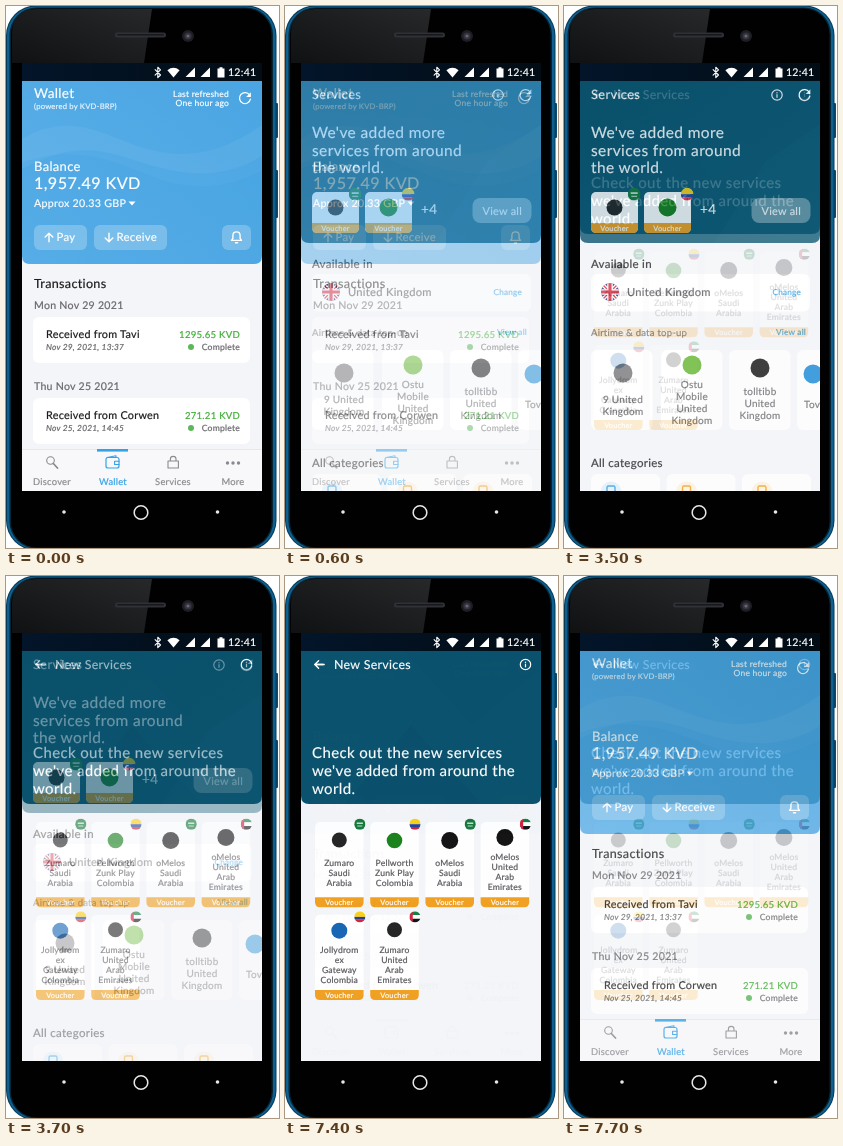
These frames come from a looping animation (273 px wide and 542 px high, 7800 ms). An HTML page:

```html
<!DOCTYPE html>
<html lang="en">
<head>
<meta charset="utf-8">
<title>Wallet app</title>
<style>
  html, body { margin: 0; width: 100%; height: 100%; overflow: hidden; background: #fff; }
  svg { display: block; width: 100vw; height: 100vh; }
  text { font-family: Lato, "Open Sans", sans-serif; font-weight: 400; letter-spacing: .025em;
         text-rendering: geometricPrecision; white-space: pre; }
</style>
</head>
<body>
<svg id="stage" viewBox="0 0 273 542" xmlns="http://www.w3.org/2000/svg"></svg>
<script>
const INK = '#1b1b1d', GREY = '#67676b', BLUE = '#35a2e6', GREEN = '#3fae35',
      ORANGE = '#f0a020', PAGE = '#f4f5f8';

// ---- drawing helpers ----
const rect = (x, y, w, h, fill, r = 0, more = '') =>
  `<rect x="${x}" y="${y}" width="${w}" height="${h}" rx="${r}" fill="${fill}" ${more}/>`;
const disc = (x, y, r, fill, more = '') =>
  `<circle cx="${x}" cy="${y}" r="${r}" fill="${fill}" ${more}/>`;
const line = (d, color, w = 1) =>
  `<path d="${d}" fill="none" stroke="${color}" stroke-width="${w}" stroke-linecap="round" stroke-linejoin="round"/>`;
const shape = (d, fill, more = '') => `<path d="${d}" fill="${fill}" ${more}/>`;
const at = (x, y, body) => `<g transform="translate(${x} ${y})">${body}</g>`;
const text = (x, y, s, size, fill = INK, anchor = 'start', more = '') =>
  `<text x="${x}" y="${y}" font-size="${size}" fill="${fill}" stroke="${fill}" stroke-width=".2" text-anchor="${anchor}" ${more}>${s}</text>`;
const lines = (x, y, step, list, size, fill, anchor) =>
  list.map((s, i) => text(x, y + i * step, s, size, fill, anchor)).join('');

// ---- icons, centred on the given point ----
const refresh = (x, y) => at(x, y,
  line('M4.6 -3A5.5 5.5 0 1 0 5.4 1.2', '#fff', 1.3) + shape('M5.9 -5.8V-1H1.1Z', '#fff'));
const info = (x, y) => disc(x, y, 5.2, 'none', 'stroke="#fff" stroke-width="1.2"') +
  rect(x - .6, y - .8, 1.2, 3.6, '#fff') + rect(x - .6, y - 2.8, 1.2, 1.2, '#fff');
const arrow = (x, y, turn) =>
  `<g transform="translate(${x} ${y}) rotate(${turn})">${line('M0 4.2V-4M-3.8 -.4L0 -4.2L3.8 -.4', '#fff', 1.4)}</g>`;
const bell = (x, y) => at(x, y,
  line('M-5 3.4H5L3.6 1.4V-1.4C3.6 -6.4 -3.6 -6.4 -3.6 -1.4V1.4Z', '#fff', 1.4) + line('M-1 5.8H1', '#fff', 1.5));

let clipId = 0;
function flag(kind, x, y, r) {
  const id = 'flag' + clipId++;
  const band = (top, h, c) => rect(-r, top * r, 2 * r, h * r, c);
  const art = {
    sa: () => band(-1, 2, '#16793c') + rect(-r * .55, -r * .3, r * 1.1, r * .25, '#d5e8da') +
      rect(-r * .45, r * .25, r * .9, r * .15, '#d5e8da'),
    co: () => band(-1, 1, '#fbd116') + band(0, .5, '#23429a') + band(.5, .5, '#d4213d'),
    ae: () => band(-1, .67, '#12803f') + band(-.33, .66, '#fff') + band(.33, .67, '#111') +
      rect(-r, -r, r * .6, 2 * r, '#d4213d'),
    uk: () => band(-1, 2, '#26377f') +
      line(`M${-r} ${-r}L${r} ${r}M${r} ${-r}L${-r} ${r}`, '#fff', r * .42) +
      line(`M${-r} ${-r}L${r} ${r}M${r} ${-r}L${-r} ${r}`, '#d32c41', r * .15) +
      line(`M0 ${-r}V${r}M${-r} 0H${r}`, '#fff', r * .62) +
      line(`M0 ${-r}V${r}M${-r} 0H${r}`, '#d32c41', r * .35)
  }[kind]();
  return at(x, y, `<clipPath id="${id}"><circle r="${r}"/></clipPath><g clip-path="url(#${id})">${art}</g>`);
}

const header = (bottom, fill) =>
  shape(`M16 75H256V${bottom - 8}Q256 ${bottom} 248 ${bottom}H24Q16 ${bottom} 16 ${bottom - 8}Z`, fill);

function voucher(x, y, w, h, land, color, r, logoY, flagR = 5.6) {
  return rect(x, y, w, h, '#fff', 5) +
    shape(`M${x} ${y + h - 10}H${x + w}V${y + h - 5}q0 5 -5 5H${x + 5}q-5 0 -5 -5Z`, ORANGE) +
    text(x + w / 2, y + h - 2.4, 'Voucher', 7.4, '#fff', 'middle', 'font-weight="700"') +
    disc(x + w / 2, logoY, r, color) + flag(land, x + w - 3.8, y + 2.2, flagR);
}

// ---- screens ----
function wallet() {
  const entry = (y, who, date, sum) =>
    rect(27, y, 217, 46, '#fff', 6) +
    text(40, y + 21, 'Received from ' + who, 10.8) +
    text(40, y + 33, date, 8.4, GREY, 'start', 'font-style="italic"') +
    text(234, y + 21, sum + ' KVD', 9.6, GREEN, 'end') +
    disc(185, y + 30, 3, '#5cb85a') + text(234, y + 33, 'Complete', 8.6, GREY, 'end');
  const tab = (x, name, color = '#8a8a8e') => text(x, 479, name, 9.4, color, 'middle');
  const pill = (x, w) => rect(x, 219, w, 25, '#fff', 6, 'opacity=".23"');
  return header(258, 'url(#sky)') +
    shape('M16 133C62 105 96 128 132 140S207 154 256 119V150C207 180 162 165 122 152S55 142 16 163Z', '#fff', 'opacity=".05"') +
    shape('M16 157C66 137 110 155 146 170S219 184 256 164V250Q256 258 248 258H24Q16 258 16 250Z', '#2f91d5', 'opacity=".12"') +
    text(28, 92, 'Wallet', 13.6, '#fff') +
    text(28, 103, '(powered by KVD-BRP)', 7.7, '#e8f4fc') +
    text(223, 91, 'Last refreshed', 8.5, '#fff', 'end') + text(223, 100, 'One hour ago', 8.5, '#fff', 'end') +
    refresh(239, 92) +
    text(28, 165, 'Balance', 13, '#fff') + text(28, 183, '1,957.49 KVD', 16.2, '#fff') +
    text(28, 201, 'Approx 20.33 GBP', 10.7, '#fff') + shape('M122.5 195.5H129.5L126 199.5Z', '#fff') +
    pill(28, 53) + arrow(43, 231.5, 0) + text(50.5, 235.3, 'Pay', 11.4, '#fff') +
    pill(88, 73) + arrow(103, 231.5, 180) + text(110.5, 235.3, 'Receive', 11.4, '#fff') +
    pill(216, 29) + bell(230.5, 231) +
    text(28, 282, 'Transactions', 12.6) +
    text(28, 303, 'Mon Nov 29 2021', 10.6, GREY) + entry(311, 'Tavi', 'Nov 29, 2021, 13:37', '1295.65') +
    text(28, 384, 'Thu Nov 25 2021', 10.6, GREY) + entry(392, 'Corwen', 'Nov 25, 2021, 14:45', '271.21') +
    rect(16, 443, 240, 42, '#f8f8fa') + rect(16, 443, 240, .6, '#dedee2') + rect(91, 443, 31, 2.6, BLUE) +
    disc(44.5, 454.5, 3.8, 'none', 'stroke="#8a8a8e" stroke-width="1.1"') + line('M47.3 457.5L51.5 462', '#8a8a8e', 1.8) +
    rect(100, 451.5, 13, 10.5, 'none', 2, `stroke="${BLUE}" stroke-width="1.2"`) +
    line('M101 451.5L110 449.8V451.5M113 455.3H108.6V458.5H113', BLUE, 1.1) +
    line('M162 455H172.4V462H162ZM164.4 455V453C164.4 449.5 170 449.5 170 453V455', '#8a8a8e', 1.1) +
    [221.5, 227, 232.5].map(x => disc(x, 457, 1.7, '#8a8a8e')).join('') +
    tab(46, 'Discover') + tab(107, 'Wallet', BLUE) + tab(167, 'Services') + tab(227, 'More');
}

function services() {
  const carrier = (x, mid, color, logoY, y, names, step = 12) =>
    rect(x, 344, 61.5, 80, '#fff', 6) + disc(mid, logoY, 9.5, color) + lines(mid, y, step, names, 10, GREY, 'middle');
  const group = (x, color) => rect(x, 468, 69, 30, '#fff', 6) + disc(x + 20, 486, 10.5, color, 'opacity=".14"') +
    rect(x + 16, 480, 8, 9, 'none', 1.5, `stroke="${color}" stroke-width="1.4"`);
  return header(237, 'url(#sea)') +
    shape('M150 237L202 155L256 118V229Q256 237 248 237Z', '#2b7b95', 'opacity=".1"') +
    text(27, 93, 'Services', 12.9, '#fff') + info(213, 89) + refresh(240.5, 89) +
    lines(27, 132, 17.7, ["We've added more", 'services from around', 'the world.'], 15.5, '#fff') +
    voucher(27, 186, 47, 41, 'sa', '#222', 8, 201.5, 6.4) +
    voucher(80, 186, 47, 41, 'co', '#17801a', 9, 201.5, 6.4) +
    text(136, 208, '+4', 13.5, '#fff') +
    rect(187.5, 192, 59, 25, '#fff', 8, 'opacity=".38"') + text(217.3, 208.7, 'View all', 10.9, '#fff', 'middle') +
    text(27, 262, 'Available in', 11.5) +
    rect(27, 268, 219, 37.5, '#fff', 6) + flag('uk', 46, 286, 9) +
    text(63, 290, 'United Kingdom', 11.2, '#55555a') + text(237, 289, 'Change', 8.2, BLUE, 'end') +
    text(27, 330, 'Airtime &amp; data top-up', 9.5, '#77777c') + text(242, 329, 'View all', 8.3, BLUE, 'end') +
    carrier(27, 59, '#77777a', 367, 397, ['9 United', 'Kingdom']) +
    carrier(97, 128, '#62b42d', 359, 382, ['Ostu', 'Mobile', 'United', 'Kingdom']) +
    carrier(165, 196, '#111', 362, 388.5, ['tolltibb', 'United', 'Kingdom']) +
    carrier(233, 249, '#1589d6', 368, 402, []) + text(240, 402, 'Tovina', 10, GREY) +
    text(27, 461, 'All categories', 11.5) +
    group(27, '#2f9be0') + group(102.5, ORANGE) + group(178, ORANGE);
}

function fresh() {
  const card = (col, row, land, color, r, logoY, names) => {
    const x = 30 + col * 55.2, y = 246 + row * 92.7;
    return voucher(x, y, 48.6, 85.3, land, color, r, y + logoY) +
      lines(x + 24.3, y + (names.length > 3 ? 38 : 44), 10, names, 8.6, '#55555a', 'middle');
  };
  const emirates = ['United', 'Arab', 'Emirates'];
  return header(228, '#0a516c') +
    shape('M60 228L126 150L196 228Z', '#063f58', 'opacity=".12"') +
    shape('M120 75L187 148L256 92V75Z', '#063f58', 'opacity=".08"') +
    arrow(34, 88.5, -90) + line('M30 88.5H39.2', '#fff', 1.4) +
    text(49, 93, 'New Services', 12.4, '#fff') + info(240.5, 88.5) +
    lines(27, 182, 18, ['Check out the new services', "we've added from around the", 'world.'], 15, '#fff') +
    card(0, 0, 'sa', '#222', 7.5, 18, ['Zumaro', 'Saudi', 'Arabia']) +
    card(1, 0, 'co', '#17801a', 7.8, 18.5, ['Pellworth', 'Zunk Play', 'Colombia']) +
    card(2, 0, 'sa', '#111', 8.5, 18.5, ['oMelos', 'Saudi', 'Arabia']) +
    card(3, 0, 'ae', '#111', 8.5, 15.5, ['oMelos', ...emirates]) +
    card(0, 1, 'co', '#1464b4', 8, 16, ['Jollydrom', 'ex', 'Gateway', 'Colombia']) +
    card(1, 1, 'ae', '#222', 7.5, 15, ['Zumaro', ...emirates]);
}

// ---- phone ----
function phone() {
  return rect(268, 97, 4, 35, '#0c4a72', 1) + rect(268, 164, 4, 48, '#0c4a72', 1) +
    rect(0, -.5, 270.5, 545, '#083a58', 30) + rect(1, .5, 268.5, 543, '#0d608f', 29) +
    rect(3.5, 1.5, 263.5, 541, '#052536', 27) + rect(5, 2.5, 260.5, 539, '#010102', 26) +
    shape('M6 57V28Q6 3 31 3H146L138 57Z', 'url(#glare)') +
    rect(109, 26.5, 51, 5, '#303136', 2.5) + rect(111, 28, 47, 1.6, '#17181b', .8) +
    disc(182, 30, 6, '#1d1e23') + disc(182, 30, 3.6, '#33343e') + disc(182, 30, 1.6, '#6c6272') +
    disc(58, 506, 1.8, '#e8e8e8') + disc(211.5, 506, 1.8, '#e8e8e8') +
    disc(135, 506.5, 6.8, 'none', 'stroke="#e8e8e8" stroke-width="1.5"');
}

function statusBar() {
  const signal = x => shape(`M${x} 71H${x + 9.5}V61.5Z`, '#fff');
  return rect(16, 57, 240, 18, 'url(#bar)') +
    line('M149.1 63.6L154.5 69L151.8 71.6V61.2L154.5 63.8L149.1 69.2', '#fff', 1.1) +
    shape('M161.4 64.2Q167.5 59.4 173.6 64.2L167.5 71.4Z', '#fff') +
    signal(179.5) + signal(194.5) +
    shape('M211.5 62.5H213.5V61.2H216.5V62.5H218.5V71.5H211.5Z', '#fff') +
    text(250.5, 70.4, '12:41', 10.6, '#fff', 'end', 'font-weight="700"');
}

const layer = (id, body) => `<g id="${id}">${rect(16, 75, 240, 410, PAGE)}${body}</g>`;
const ramp = (id, x1, y1, x2, y2, from, to) =>
  `<linearGradient id="${id}" x1="${x1}" y1="${y1}" x2="${x2}" y2="${y2}"><stop stop-color="${from}"/><stop offset="1" stop-color="${to}"/></linearGradient>`;
const stage = document.getElementById('stage');
stage.innerHTML = '<defs>' +
  ramp('sky', 0, 1, 1, 0, '#5cb0e9', '#4aa5e2') +
  ramp('sea', 0, 0, 1, 1, '#0a506b', '#0f5a75') +
  ramp('glare', 0, 1, 1, 0, '#101113', '#26282a') +
  ramp('bar', 0, 0, 1, 0, '#03152a', '#020c14') +
  '<clipPath id="view"><rect x="16" y="75" width="240" height="410"/></clipPath></defs>' +
  phone() + statusBar() +
  `<g clip-path="url(#view)">${layer('wallet', wallet())}${layer('services', services())}${layer('fresh', fresh())}</g>`;

// ---- timing: stepped cross-fades ----
const LOOP = 7800, STEP = 100;
const servicesLayer = document.getElementById('services');
const freshLayer = document.getElementById('fresh');

function fade(t, start, first, gain) {
  if (t < start) return 0;
  return Math.min(1, first + gain * Math.floor((t - start) / STEP));
}

function show(t) {
  const toServices = fade(t, 500, .25, .25);
  const toFresh = fade(t, 3500, .2, .2);
  const toWallet = fade(t, 7400, .02, .26);
  servicesLayer.setAttribute('opacity', t < 3900 ? toServices : 0);
  freshLayer.setAttribute('opacity', toFresh * (1 - toWallet));
}

let begin = null;
function tick(now) {
  if (begin === null) begin = now;
  show((now - begin) % LOOP);
  requestAnimationFrame(tick);
}
show(0);
requestAnimationFrame(tick);
</script>
</body>
</html>
```
